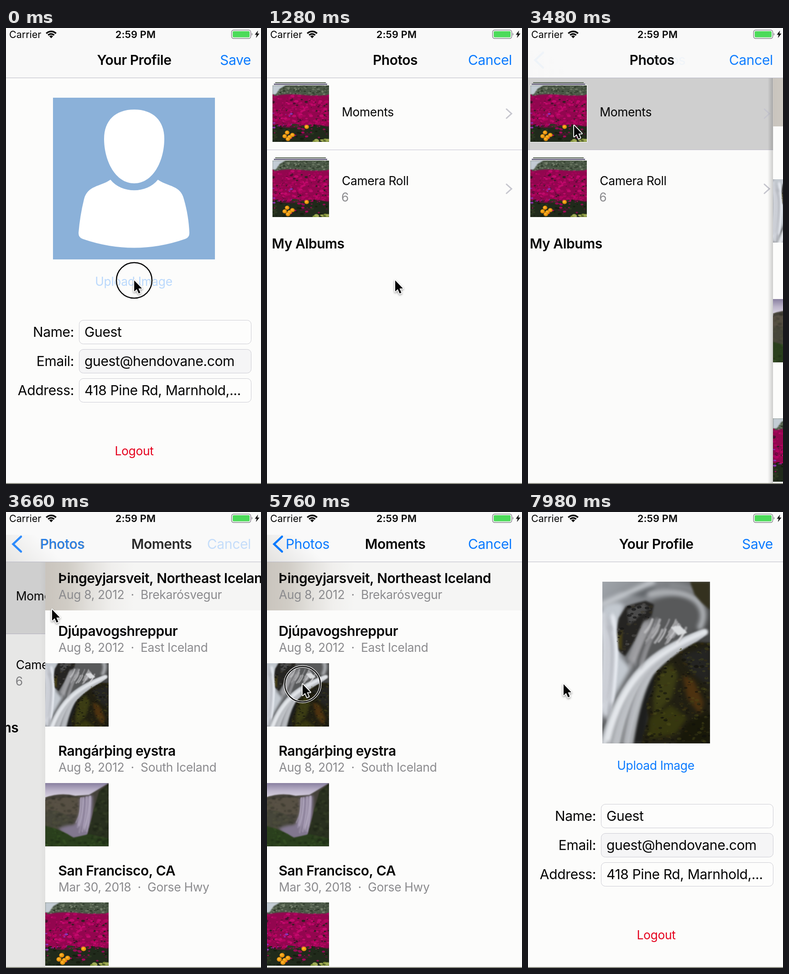
An HTML page with a canvas for the animation above (8000 ms loop, 559 px wide and 1001 px high).

```html
<!DOCTYPE html>
<html lang="en">
<head>
<meta charset="utf-8">
<title>Profile photo picker</title>
<style>
  html, body { margin: 0; width: 100%; height: 100%; overflow: hidden; background: #fcfcfb; }
  canvas { display: block; width: 100%; height: 100%; }
</style>
</head>
<body>
<canvas id="stage" width="559" height="1001"></canvas>
<script>
const W = 559, H = 1001, LOOP = 8000;
const BLUE = '#0a7aff', GRAY = '#8b8b8e', PAPER = '#fcfcfb', BAR = '#f9f9f9';
const stage = document.getElementById('stage');
let c = stage.getContext('2d');

const clamp = v => Math.max(0, Math.min(1, v));
const ramp = (t, a, b) => clamp((t - a) / (b - a));
const ease = p => p * p * (3 - 2 * p);
const mix = (a, b, p) => a + (b - a) * p;

// Remaining distance (1 to 0) of a critically damped spring.
function spring(t, start) {
  const x = Math.max(0, t - start) * 0.0166;
  return (1 + x) * Math.exp(-x);
}

function rng(seed) {
  return () => (seed = (seed * 16807) % 2147483647) / 2147483647;
}

function rect(x, y, w, h, fill) {
  c.fillStyle = fill;
  c.fillRect(x, y, w, h);
}

function shape(d, fill) {
  c.fillStyle = fill;
  c.fill(new Path2D(d));
}

function line(d, color, width) {
  c.strokeStyle = color;
  c.lineWidth = width;
  c.stroke(new Path2D(d));
}

function dot(x, y, rx, ry, fill) {
  c.fillStyle = fill;
  c.beginPath();
  c.ellipse(x, y, rx, ry, 0, 0, 7);
  c.fill();
}

function fade(x0, y0, x1, y1, ...stops) {
  const g = c.createLinearGradient(x0, y0, x1, y1);
  stops.forEach((s, i) => g.addColorStop(i / (stops.length - 1), s));
  return g;
}

// Scatters small blobs over a region.
function speckle(n, region, size, tones, seed) {
  const r = rng(seed);
  c.save();
  c.clip(new Path2D(region[0]));
  const [, x, y, w, h] = region;
  for (let i = 0; i < n; i++) {
    const s = size * (0.3 + r());
    dot(x + r() * w, y + r() * h, s, s * 0.6, tones[i % tones.length]);
  }
  c.restore();
}

function text(s, x, y, o = {}) {
  const { size = 30, weight = 400, color = '#050505', align = 'left', alpha = 1, track } = o;
  c.save();
  c.globalAlpha *= alpha;
  c.font = `${weight} ${size}px Inter, sans-serif`;
  c.letterSpacing = (track ?? (weight > 400 ? -0.016 : -0.012)) * size + 'px';
  c.textAlign = align;
  c.fillStyle = color;
  c.fillText(s, x, y);
  c.restore();
}

function picture(w, h, draw) {
  const cv = document.createElement('canvas');
  cv.width = w;
  cv.height = h;
  const main = c;
  c = cv.getContext('2d');
  c.lineCap = c.lineJoin = 'round';
  draw();
  c = main;
  return cv;
}

const flowers = picture(139, 139, () => {
  const bed = 'M0 0H139V139H0Z';
  rect(0, 0, 139, 139, '#202a1b');
  rect(0, 0, 139, 30, '#4b5847');
  speckle(170, [bed, 8, 0, 131, 28], 2.6, ['#67745f', '#2f3b2b', '#76826e', '#414f3c'], 71);
  c.filter = 'blur(1px)';
  shape('M0 0H32L18 8L8 22H0Z', '#c3ccd4');
  shape('M0 27Q35 19 70 23T139 24V102Q100 92 70 100T0 98Z', '#93064f');
  c.filter = 'none';
  speckle(75, [bed, 0, 30, 139, 72], 3, ['#4b0e31', '#2b2220'], 5);
  speckle(230, [bed, 0, 24, 139, 76], 4.2, ['#b2045f', '#a5055a', '#c20a6c', '#970650'], 9);
  speckle(60, [bed, 0, 96, 139, 43], 4, ['#161d10', '#2b3820', '#45192f'], 17);
  speckle(22, [bed, 0, 94, 139, 36], 3.6, ['#a5075a', '#8f0a52'], 23);
  speckle(11, [bed, 0, 66, 52, 40], 3, ['#8f32b5'], 31);
  [[36, 116], [30, 125], [42, 127], [49, 122], [38, 132], [84, 102]].forEach(([x, y]) => {
    dot(x, y, 5.5, 5, '#e8930e');
    dot(x - 1, y - 1, 3, 2.5, '#ffb328');
  });
  speckle(16, [bed, 103, 132, 36, 9], 4, ['#7d8f35', '#a0ab55'], 41);
});

const rapids = picture(236, 355, () => {
  const r = rng(37);
  const boulder = 'M30 112L36 80L52 54L78 46L95 42L113 50L108 75L88 92L72 128L50 164L34 150Z';
  const cliff = 'M115 200L145 172L172 146L205 132L236 134V355H84L100 300L96 268L110 238Z';
  rect(0, 0, 236, 355, fade(0, 0, 200, 150, '#a0a5ab', '#7a7d81', '#454646'));

  c.filter = 'blur(5px)';
  shape('M0 55Q30 38 48 52L30 110L40 165L62 190L0 300Z', '#c3c9d0');
  shape('M95 50Q165 15 200 45Q225 75 200 105L140 150L80 178L62 165Z', '#58595a');
  shape('M40 24L90 6L120 14L90 34Z', '#62666a');
  line('M0 50Q60 22 110 0', '#c5c9ce', 12);
  line('M105 28Q170 14 205 40Q232 66 214 100', '#aeb1b5', 13);
  line('M150 8Q190 8 226 34', '#8d9094', 8);
  shape('M105 188L145 165L130 215L108 250L92 355H62L82 270Z', '#1d1e1d');

  c.filter = 'blur(2px)';
  shape('M192 0H236V62L218 46L202 28Z', '#34311f');
  shape(boulder, '#252422');
  shape('M54 62L92 48L104 58L80 76L58 96Z', '#4a4a4a');
  shape('M32 115L44 105L43 152L35 144Z', '#474018');
  shape(cliff, '#211f12');

  // Long-exposure streaks: falling column, main stream and spray.
  c.filter = 'blur(3px)';
  for (let i = 0; i < 22; i++) {
    const x = r() * 28, k = 170 + (i % 5) * 17;
    line(`M${x} ${60 + r() * 60}Q${x + 14} 150 ${x - 4} ${250 + r() * 60}`,
      `rgba(${k + 8},${k + 12},${k + 18},.7)`, 4 + r() * 5);
  }
  for (let i = 0; i < 30; i++) {
    const d = r(), k = 165 + r() * 75, top = 108 + 18 * d;
    line(`M${228 - d * 25} ${top}Q${130 + d * 12} ${140 + d * 20} ${84 + d * 24} ${188 + d * 14}` +
      `Q${20 + d * 60} 250 ${d * 72 - 8} 355`, `rgba(${k},${k + 3},${k + 8},.75)`, 4 + 4 * r());
  }
  line('M226 110Q135 148 92 192Q35 250 12 345', '#e6e9ed', 10);
  for (let i = 0; i < 12; i++) {
    const x = 78 + r() * 32, k = 130 + r() * 85;
    line(`M${x + 12} ${78 + r() * 30}Q${x - 8} 130 ${x - 24} ${168 + r() * 22}`,
      `rgba(${k},${k},${k + 4},.75)`, 4);
  }

  c.filter = 'blur(1.5px)';
  for (let i = 0; i < 22; i++) {
    const x = 108 + r() * 78, y = 82 + r() * 28, k = 140 + r() * 90;
    line(`M${x} ${y}Q${x - 4} ${y + 14} ${x - 16} ${y + 28}`, `rgba(${k},${k},${k + 3},.8)`, 2 + r() * 4);
  }
  shape('M150 100L170 96L186 112L166 118Z', '#dadcde');
  c.filter = 'blur(4px)';
  shape('M124 208L150 178L166 205L152 255L112 300L112 250Z', '#3b3c14');
  shape('M176 205L200 215L222 265L214 292L186 255Z', '#4d3210');
  shape('M104 300L150 270L186 300L160 335L100 345Z', '#36370f');
  shape('M172 160L236 142V232L196 200Z', '#242422');
  shape('M186 310L236 285V355H160Z', '#181809');

  c.filter = 'blur(.7px)';
  speckle(420, [cliff, 84, 130, 152, 225], 4,
    ['#4a4a1666', '#10100b99', '#5b591f55', '#15140e99', '#3b2f1066', '#37371866'], 29);
  speckle(90, [boulder, 30, 42, 84, 122], 4, ['#57565377', '#141413aa', '#3e392666'], 43);
});

const falls = picture(139, 139, () => {
  const land = 'M0 32Q32 20 66 28L96 26L139 0V139H0Z';
  rect(0, 0, 139, 139, '#48443a');
  rect(0, 0, 139, 36, fade(0, 0, 0, 34, '#8980a0', '#bdb5cb', '#ded9e5'));
  c.filter = 'blur(1px)';
  shape(land, '#45423a');
  shape('M0 38Q40 28 78 34V70L0 66Z', '#575044');
  shape('M0 60Q34 56 62 84L74 118H0Z', '#46463a');
  speckle(190, [land, 0, 28, 80, 92], 4, ['#5c584955', '#2f302777', '#4f503c77'], 19);
  c.filter = 'blur(3px)';
  shape('M76 33L104 27L103 70L96 118H52Q68 88 75 66Z', '#8c819c');
  shape('M28 100Q60 84 96 98L88 120H50Z', '#81778e');
  c.filter = 'blur(1.2px)';
  const r = rng(53);
  for (let i = 0; i < 22; i++) {
    const x = 78 + r() * 23, k = 140 + r() * 65;
    line(`M${x} ${33 - (x - 78) * 0.2}Q${x} 65 ${x - 5 - r() * 8} ${85 + r() * 25}`,
      `rgba(${k},${k - 10},${k + 12},.65)`, 2);
  }
  shape('M139 2L118 18L107 56L100 84L90 120L139 139Z', '#29301f');
  shape('M0 94Q35 102 62 120L96 112L139 122V139H0Z', '#2a3f1d');
  speckle(90, ['M139 2L118 18L107 56L100 84L90 120L139 139Z', 90, 0, 49, 130], 4,
    ['#3b452a88', '#1b211588'], 61);
  speckle(130, ['M0 94Q35 102 62 120L96 112L139 122V139H0Z', 0, 95, 139, 44], 3,
    ['#3b592799', '#1b2a1499', '#33481f99'], 13);
});

function navBar() {
  rect(0, 0, W, 109, BAR);
  rect(0, 109, W, 1, '#b9b9c6');
}

function title(s) {
  text(s, 281, 81, { weight: 600, align: 'center' });
}

function cancel(alpha = 1) {
  text('Cancel', 537, 81, { color: BLUE, align: 'right', alpha });
}

function avatar() {
  rect(103, 153, 355, 355, '#8bb1d9');
  shape('M281 179C322 179 347 203 347 243C347 292 322 341 281 341C240 341 215 292 215 243C215 203 240 179 281 179Z', '#fff');
  shape('M229 333C254 364 308 364 333 333C356 349 383 345 390 376C397 400 401 425 402 450' +
    'Q402 460 393 463Q281 502 168 463Q159 460 159 450C161 425 165 400 171 376C179 345 206 349 229 333Z', '#fff');
}

function field(label, value, y, fill) {
  c.beginPath();
  c.roundRect(160.5, y + 0.5, 377, 52, 9);
  c.fillStyle = fill;
  c.fill();
  c.strokeStyle = '#cdcdd4';
  c.lineWidth = 1;
  c.stroke();
  text(label, 149, y + 37, { align: 'right' });
  text(value, 172, y + 37);
}

function profile(t) {
  rect(0, 0, W, H, PAPER);
  navBar();
  title('Your Profile');
  text('Save', 537, 81, { color: BLUE, align: 'right' });
  if (t < 4000) avatar();
  else c.drawImage(rapids, 163, 153);
  text('Upload Image', 280, 566, {
    size: 26.4, color: BLUE, align: 'center', alpha: mix(0.27, 1, ramp(t, 150, 350))
  });
  field('Name:', 'Guest', 641, '#fdfdfc');
  field('Email:', 'guest@hendovane.com', 705, '#f5f5f6');
  field('Address:', '418 Pine Rd, Marnhold,...', 769, '#fdfdfc');
  text('Logout', 281, 938, { size: 26.4, color: '#e5001d', align: 'center' });
}

function albumRow(y, name, baseline) {
  rect(18, y + 9, 111, 2, '#596656');
  rect(15, y + 12, 117, 3, '#716d86');
  rect(11, y + 15, 126, 126, '#fff');
  c.drawImage(flowers, 12, y + 16, 124, 124);
  text(name, 164, baseline, { size: 26.4 });
  line(`M525 ${y + 68}L536 ${y + 78}L525 ${y + 88}`, '#c6c6ce', 3);
}

function albums(highlight) {
  rect(-3, 110, W + 6, H, PAPER);
  rect(-3, 110, W + 6, 158, `rgba(208,208,208,${highlight})`);
  rect(-3, 267, W + 6, 1, '#c3c0d0');
  albumRow(110, 'Moments', 194);
  albumRow(275, 'Camera Roll', 345);
  text('6', 163, 381, { size: 26.4, color: GRAY });
  text('My Albums', 10.5, 484, { weight: 600 });
}

function moment(name, info, y) {
  text(name, 25.5, y + 47, { weight: 600 });
  text(info, 26, y + 82, { size: 26.4, color: GRAY });
}

function moments() {
  rect(-3, 110, W + 6, H, PAPER);
  rect(-3, 110, W + 6, 106, '#f5f5f4');
  rect(-3, 110, 195, 106, fade(-3, 0, 192, 0, '#c9c4bd', '#d0ccc5', '#e2e0dc', '#f0efed', '#f5f5f4'));
  moment('Þingeyjarsveit, Northeast Iceland', 'Aug 8, 2012  ·  Brekarósvegur', 109);
  moment('Djúpavogshreppur', 'Aug 8, 2012  ·  East Iceland', 225);
  moment('Rangárþing eystra', 'Aug 8, 2012  ·  South Iceland', 488);
  moment('San Francisco, CA', 'Mar 30, 2018  ·  Gorse Hwy', 751);
  c.drawImage(rapids, 0, 60, 236, 236, -3, 332, 139, 139);
  c.drawImage(falls, -3, 595);
  c.drawImage(flowers, -3, 857);
}

function picker(t) {
  const q = spring(t, 3462), p = 1 - q, x = 563 * q;
  rect(0, 0, W, H, PAPER);
  if (p < 0.999) {
    c.save();
    c.translate(-169 * p, 0);
    albums(t > 3370 ? 1 - p / 2 : 0);
    c.restore();
    rect(0, 110, x - 3, H, `rgba(0,0,0,${0.1 * p})`);
  }
  if (p > 0) {
    rect(x - 15, 110, 12, H, fade(x - 15, 0, x - 3, 0, 'rgba(0,0,0,0)', `rgba(0,0,0,${0.2 * q})`));
    c.save();
    c.translate(x, 0);
    moments();
    c.restore();
  }

  navBar();
  if (p > 0) {
    c.globalAlpha = p;
    rect(0, 50, 200, 59, fade(0, 109, 60, 45, '#e3e2e0', BAR));
    c.globalAlpha = 1;
    text('Photos', 230 - 185 * p, 81, { weight: 600, alpha: Math.sqrt(q) });
    text('Photos', 41 + 217 * q, 81, { color: BLUE, alpha: p });
    c.globalAlpha = p;
    line('M33 54L15.5 70.5L33 87', BLUE, 4.5);
    text('Moments', 281 + 379 * q, 81, { weight: 600, align: 'center' });
    c.globalAlpha = 1;
  } else {
    title('Photos');
  }
  cancel(p < 0.5 ? clamp(1.05 - 2 * p) : ramp(p, 0.8, 0.995));
}

function statusBar() {
  text('Carrier', 7, 21.5, { size: 21.5, track: 0 });
  text('2:59 PM', 284, 21.5, { size: 21.7, weight: 600, align: 'center', track: 0.01 });
  c.strokeStyle = '#050505';
  c.lineCap = 'butt';
  c.lineWidth = 3.6;
  [14.5, 9].forEach(r => {
    c.beginPath();
    c.arc(99, 22, r, -Math.PI * 0.76, -Math.PI * 0.24);
    c.stroke();
  });
  shape('M99 22.5L94.8 18Q99 14.6 103.2 18Z', '#050505');
  c.beginPath();
  c.roundRect(494.5, 4.5, 42, 18.5, 4.5);
  c.strokeStyle = '#85858a';
  c.lineWidth = 1.5;
  c.stroke();
  c.beginPath();
  c.roundRect(497, 7, 37, 13.5, 2);
  c.fillStyle = '#4cdb5a';
  c.fill();
  shape('M538.5 10.5Q542 13.5 538.5 17Z', '#85858a');
  shape('M552.5 5.5L545.5 14.8H549.6L547.8 22L555.5 12.2H551Z', '#050505');
}

const arrow = 'M0 0V24.5L5.6 19.3L9.8 28.8L13.6 27.1L9.5 17.8H17Z';

function pointer(t) {
  const a = ease(ramp(t, 2250, 2950)), b = ease(ramp(t, 4850, 5450));
  const x = mix(mix(281, 101, a), 78, b);
  const y = mix(mix(554, 214, a), 378, b);
  const down = t < 140 || (t > 3290 && t < 3445) || (t > 5700 && t < 5880);
  c.save();
  c.translate(x, y);
  if (down) {
    const ring = 'M39 0A39 39 0 1 1 -39 0A39 39 0 1 1 39 0';
    line(ring, '#fff', 5);
    line(ring, '#080808', 2.5);
  }
  c.lineJoin = 'round';
  c.shadowColor = 'rgba(0,0,0,.4)';
  c.shadowBlur = 4;
  c.shadowOffsetY = 2;
  line(arrow, '#fff', 3.6);
  c.shadowColor = 'transparent';
  shape(arrow, '#050505');
  c.restore();
}

function draw(t) {
  c.lineCap = 'round';
  c.lineJoin = 'miter';
  const y = t < 6790 ? H * spring(t, 260) : H * (1 - spring(t, 6790));
  if (y > 0.5) profile(t);
  if (y < H - 0.5) {
    c.save();
    c.translate(0, y < 0.5 ? 0 : y);
    picker(t);
    c.restore();
  }
  statusBar();
  rect(0, 999, W, 2, '#85867b');
  pointer(t);
}

const begin = performance.now();
function tick() {
  draw((performance.now() - begin) % LOOP);
  requestAnimationFrame(tick);
}
tick();
</script>
</body>
</html>
```
